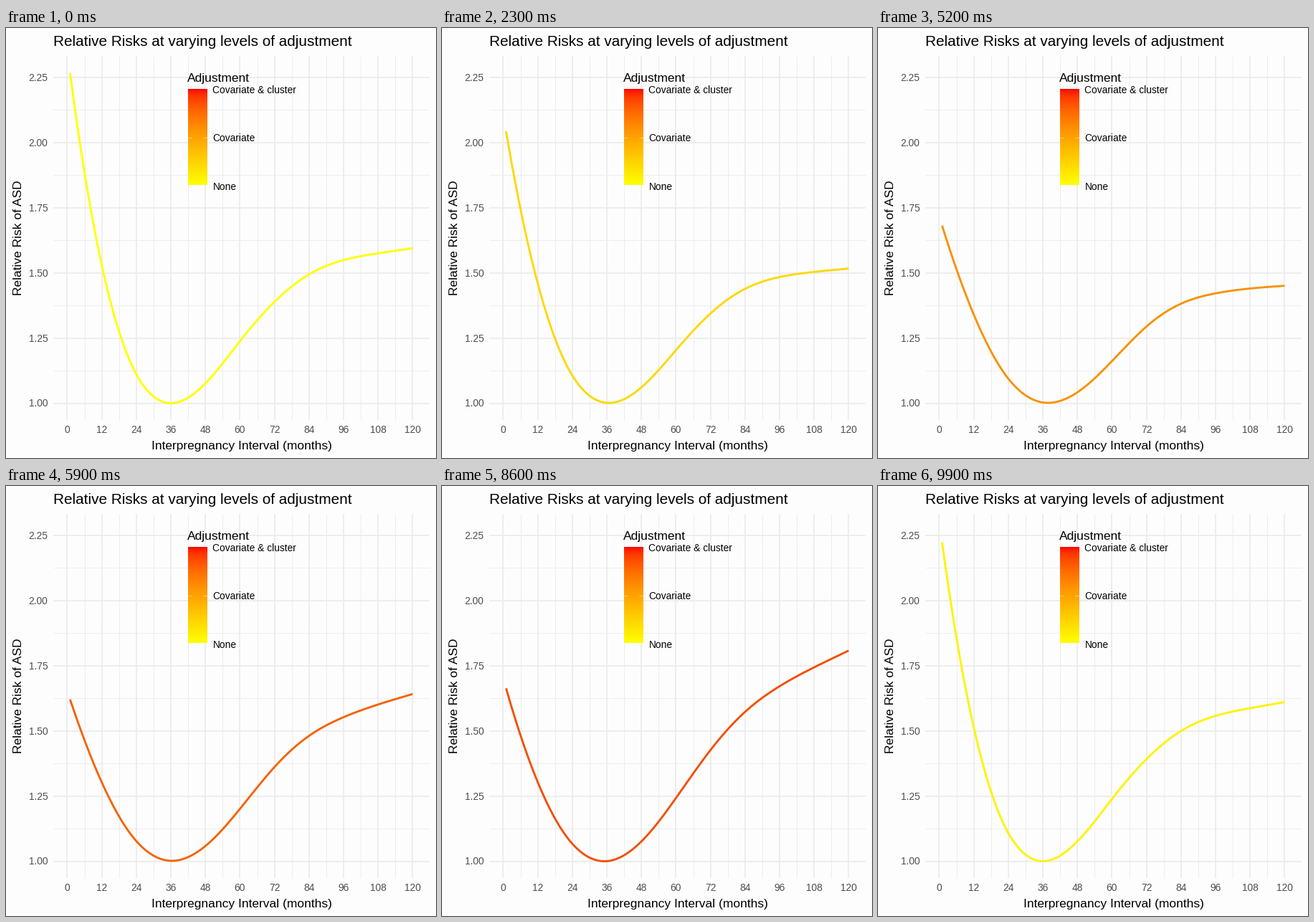
A matplotlib script that plays this animation: 600 by 600 pixels, repeating every 10000 ms.

```python
import numpy as np
import matplotlib.pyplot as plt
from matplotlib.animation import FuncAnimation

SIZE, DPI, FRAMES, INTERVAL = 600, 100, 100, 100
PX = 72 / DPI
LEFT, RIGHT, TOP, BOTTOM = 66, 591, 39, 546.5
YELLOW_LAB = np.array([97.14, -21.55, 94.48])
RED_LAB = np.array([53.24, 80.09, 67.20])

plt.rcParams["font.family"] = ["Liberation Sans", "DejaVu Sans"]


def px_x(month):
    return 85.4 + 4.0167 * month


def px_y(risk):
    return 523.5 - 363.6 * (risk - 1)


def heat(level):
    """Colour from yellow (0) to red (1), blended in CIE Lab."""
    lightness, a, b = YELLOW_LAB + (RED_LAB - YELLOW_LAB) * level
    fy = (lightness + 16) / 116
    f = np.array([fy + a / 500, fy, fy - b / 200])
    xyz = np.where(f > 6 / 29, f ** 3, (f - 4 / 29) * 108 / 841)
    xyz = xyz * [0.9505, 1, 1.089]
    rgb = np.array([[3.2406, -1.5372, -0.4986],
                    [-0.9689, 1.8758, 0.0415],
                    [0.0557, -0.2040, 1.0570]]) @ xyz
    rgb = np.clip(rgb, 0, 1)
    return np.where(rgb <= 0.0031308, 12.92 * rgb,
                    1.055 * rgb ** (1 / 2.4) - 0.055)


def natural_spline(xk, yk, x):
    n, h = len(xk), np.diff(xk)
    system, rhs = np.eye(n), np.zeros(n)
    for i in range(1, n - 1):
        system[i, i - 1:i + 2] = h[i - 1], 2 * (h[i - 1] + h[i]), h[i]
        rhs[i] = 6 * ((yk[i + 1] - yk[i]) / h[i]
                      - (yk[i] - yk[i - 1]) / h[i - 1])
    m = np.linalg.solve(system, rhs)
    i = np.clip(np.searchsorted(xk, x) - 1, 0, n - 2)
    p, q, w = xk[i + 1] - x, x - xk[i], h[i]
    return ((m[i] * p ** 3 + m[i + 1] * q ** 3) / (6 * w)
            + (yk[i] / w - m[i] * w / 6) * p
            + (yk[i + 1] / w - m[i + 1] * w / 6) * q)


months = np.arange(1, 121)
knots = np.array([1, 12, 24, 36, 48, 60, 72, 84, 96, 108, 120])
risk_points = [
    [2.267, 1.530, 1.111, 1.000, 1.076, 1.238, 1.389, 1.494, 1.549, 1.575, 1.595],
    [1.699, 1.351, 1.099, 1.003, 1.037, 1.150, 1.275, 1.3535, 1.384, 1.394, 1.396],
    [1.5555, 1.2626, 1.059, 1.000, 1.0756, 1.243, 1.433, 1.587, 1.693, 1.774, 1.846],
]
curves = [np.exp(natural_spline(knots, np.log(r), months)) for r in risk_points]
levels = [0, 0.5, 1]

fig = plt.figure(figsize=(SIZE / DPI, SIZE / DPI), dpi=DPI, facecolor="#fdfdfd")
ax = fig.add_axes([0, 0, 1, 1])
ax.axis("off")


def label(x, y, text, size, color="black", **kw):
    kw.setdefault("va", "baseline")
    ax.text(x, y, text, fontsize=size * PX, color=color, **kw)


def grid(xs, ys, width):
    style = dict(color="#ebebeb", lw=width * PX, zorder=1)
    ax.vlines(px_x(xs), TOP, BOTTOM, **style)
    ax.hlines(px_y(ys), LEFT, RIGHT, **style)


major_x, major_y = np.arange(0, 121, 12), np.arange(1, 2.3, 0.25)
grid(major_x[:-1] + 6, major_y[:-1] + 0.125, 0.85)
grid(major_x, major_y, 1.7)

for month in major_x:
    label(px_x(month), 565, str(month), 13.8, "#4d4d4d", ha="center")
for risk in major_y:
    label(58.5, px_y(risk) + 5, f"{risk:.2f}", 13.8, "#4d4d4d", ha="right")

label(65.5, 25, "Relative Risks at varying levels of adjustment", 20.8)
label(328.5, 588, "Interpregnancy Interval (months)", 17.33, ha="center")
label(22.5, 293, "Relative Risk of ASD", 17.33, rotation=90,
      ha="right", va="center", rotation_mode="default") if False else \
    label(22.5, 293, "Relative Risk of ASD", 17.33, rotation=90,
          ha="center", rotation_mode="anchor")

# Legend
label(253, 75.5, "Adjustment", 17.33)
for y, text in [(91, "Covariate & cluster"), (158, "Covariate"), (225.5, "None")]:
    label(288.5, y, text, 13.7)
bar = np.array([[heat(v)] for v in np.linspace(1, 0, 134)])
ax.imshow(bar, extent=(253.5, 280.5, 219.5, 85.5), aspect="auto",
          interpolation="nearest", zorder=2)
ax.hlines([152.8] * 2, [253.5, 275], [259, 280.5], color="white",
          lw=0.9 * PX, alpha=0.5, zorder=3)

line, = ax.plot([], [], lw=2.85 * PX, solid_capstyle="butt",
                solid_joinstyle="round", zorder=4)
ax.set_xlim(0, SIZE)
ax.set_ylim(SIZE, 0)


def update(frame):
    # Each state rests for 17 frames, then blends linearly for 16.5.
    state, phase = divmod(frame, 33.5)
    state = int(state)
    nxt = (state + 1) % 3
    t = np.clip((phase - 16.5) / 16.5, 0, 1)
    risk = curves[state] + (curves[nxt] - curves[state]) * t
    level = levels[state] + (levels[nxt] - levels[state]) * t
    line.set_data(px_x(months), px_y(risk))
    line.set_color(heat(level) * (1 - 0.05 * level))
    return line,


anim = FuncAnimation(fig, update, frames=FRAMES, interval=INTERVAL,
                     repeat=True, repeat_delay=0, blit=False)
plt.show()
```
